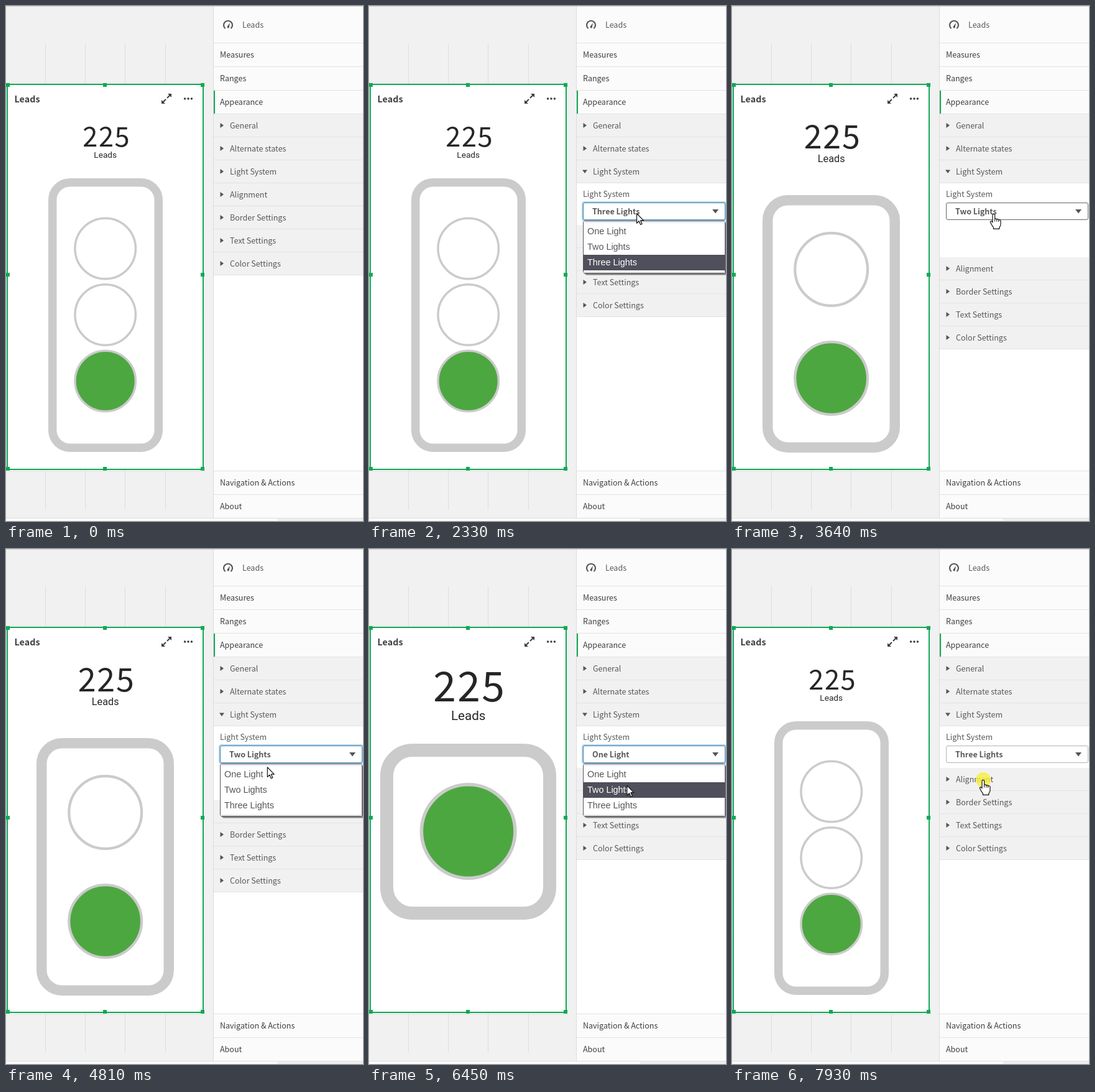
Recreate the animation shown at these times as an HTML page. Size 574 by 828 pixels, loop 8 s.

```html
<!DOCTYPE html>
<html lang="en">
<head>
<meta charset="utf-8">
<title>Light system settings</title>
<style>
  html, body { margin: 0; width: 100%; height: 100%; overflow: hidden; background: #fff; }
  svg { display: block; }
  text { font: 12.53px "Noto Sans CJK JP", "Noto Sans CJK SC", "Noto Sans CJK", sans-serif; fill: #595959; white-space: pre; }
  .dark { fill: #404040; }
  .bold { font-weight: 700; }
  .value { fill: #262626; letter-spacing: .035em; text-anchor: middle; }
  .label { fill: #262626; font-family: Roboto, sans-serif; text-anchor: middle; }
  .option { font: 14.4px "Liberation Sans", Arial, sans-serif; }
</style>
</head>
<body>
<svg id="stage" width="574" height="828" viewBox="0 0 574 828"></svg>
<script>
const LOOP = 8000;
const GREEN = '#0fa955', GREY = '#cbcbcb', LINE = '#e3e3e3', INK = '#555';
const NAMES = ['', 'One Light', 'Two Lights', 'Three Lights'];
const stage = document.getElementById('stage');

function el(tag, attrs, parent = stage) {
  const node = document.createElementNS('http://www.w3.org/2000/svg', tag);
  for (const key in attrs) node.setAttribute(key, attrs[key]);
  return parent.appendChild(node);
}
const group = parent => el('g', {}, parent);
const rect = (x, y, width, height, fill, parent) => el('rect', { x, y, width, height, fill }, parent);
const path = (d, attrs, parent) => el('path', { d, ...attrs }, parent);
function text(str, x, y, cls = '', parent) {
  const node = el('text', { x, y, class: cls }, parent);
  node.textContent = str;
  return node;
}
const show = (node, on) => node.setAttribute('visibility', on ? 'inherit' : 'hidden');

// Sheet with grid
rect(0, 0, 333, 824, '#f1f1f1');
for (const x of [63, 127, 191, 256]) rect(x, 60, 1, 750, '#dedede');
for (let i = 1; i < 12; i++) rect(0, Math.round(60 + i * 62.5), 320, 1, '#e4e4e4');

// Card
el('rect', { x: 2, y: 126, width: 315, height: 619, fill: '#fff', stroke: GREEN, 'stroke-width': 2 });
for (const x of [0, 156, 313])
  for (const y of [124, 429, 741])
    if (x !== 156 || y !== 429) rect(x, y, 6, 6, GREEN);
text('Leads', 13.5, 155, 'dark bold').style.fontSize = '14.4px';
path('M260 141h6v6zM250 151v6h6z', { fill: '#404040' });
path('M259 148l5-5M257 150l-5 5', { stroke: '#404040', 'stroke-width': 2 });
for (const cx of [287.6, 293, 298.4]) el('circle', { cx, cy: 149, r: 1.8, fill: '#404040' });

// Traffic lights
const looks = [
  { x: 18, y: 313, w: 283, h: 283, border: 21, round: 52, lamps: [454], r: 78, ring: 5.5, size: 66, base: 245, small: 20.6, foot: 275 },
  { x: 49, y: 304, w: 221, h: 414, border: 16.5, round: 41, lamps: [423.5, 598.5], r: 60.5, ring: 4.2, size: 52, base: 229, small: 16.3, foot: 251 },
  { x: 68, y: 277, w: 184, h: 440, border: 13.5, round: 35, lamps: [390, 496.5, 603], r: 50.5, ring: 3.5, size: 43.4, base: 226, small: 13.7, foot: 244 }
];
const lights = looks.map(k => {
  const g = group(), b = k.border;
  text('225', 161.7, k.base, 'value', g).style.fontSize = k.size + 'px';
  text('Leads', 159.7, k.foot, 'label', g).style.fontSize = k.small + 'px';
  el('rect', {
    x: k.x + b / 2, y: k.y + b / 2, width: k.w - b, height: k.h - b, rx: k.round - b / 2,
    fill: '#fff', stroke: GREY, 'stroke-width': b
  }, g);
  k.lamps.forEach((cy, i) => el('circle', {
    cx: 159.7, cy, r: k.r - k.ring / 2, stroke: GREY, 'stroke-width': k.ring,
    fill: i === k.lamps.length - 1 ? '#4da740' : '#fff'
  }, g));
  return g;
});

// Property panel
rect(333, 0, 241, 824, '#fff');
rect(333, 0, 1, 824, '#dcdcdc');
rect(334, 1, 240, 58, '#fbfbfb');
rect(334, 59, 240, 1, LINE);
path('M352.6 36.2A7 7 0 1 1 361.4 36.2', { fill: 'none', stroke: INK, 'stroke-width': 2.2 });
path('M355.4 33.5L360 27l-1.4 8a1.9 1.9 0 0 1-3.2-1.5z', { fill: INK });
text('Leads', 380, 35);

function section(name, y) {
  rect(334, y, 240, 37, '#fbfbfb');
  rect(334, y + 37, 240, 1, LINE);
  text(name, 344, y + 23, 'dark');
}
section('Measures', 60);
section('Ranges', 98);
section('Appearance', 136);
rect(334, 136, 2, 37, GREEN);
rect(334, 747, 240, 1, LINE);
section('Navigation & Actions', 748);
section('About', 786);

const rest = group();
let closedMark;
['General', 'Alternate states', 'Light System', 'Alignment', 'Border Settings', 'Text Settings', 'Color Settings']
  .forEach((name, i) => {
    const y = 174 + i * 37, parent = i > 2 ? rest : stage;
    rect(334, y, 240, 36, '#f1f1f1', parent);
    rect(334, y + 36, 240, 1, LINE, parent);
    const mark = path(`M344.5 ${y + 14}v8l5.5-4z`, { fill: INK }, parent);
    if (i === 2) closedMark = mark;
    text(name, 360, y + 23, '', parent);
  });

const details = group();
path('M343 263.5h8l-4 5.5z', { fill: INK }, details);
text('Light System', 344, 307, '', details);
const glow = el('rect', { x: 343.5, y: 315.5, width: 230, height: 29, rx: 3, fill: 'none', stroke: '#a9d2ea', 'stroke-width': 3 }, details);
const field = el('rect', { x: 344.5, y: 316.5, width: 228, height: 27, rx: 2.5, fill: '#fff' }, details);
const choice = text('', 359, 335, 'bold', details);
path('M552 327h10l-5 6.5z', { fill: INK }, details);

const menu = group();
el('rect', { x: 348, y: 349, width: 227, height: 84, rx: 3, fill: '#000', opacity: .25 }, menu);
el('rect', { x: 346, y: 347, width: 228, height: 85, rx: 3, fill: '#000', opacity: .3 }, menu);
el('rect', { x: 344.5, y: 345.5, width: 228, height: 84, rx: 2.5, fill: '#fff', stroke: '#55555f' }, menu);
rect(345, 346, 227, 3, '#eaeaef', menu);
rect(345, 426, 227, 3, '#f1f1f4', menu);
const bar = rect(345, 350, 227, 25, '#504f5c', menu);
const options = [1, 2, 3].map(n => text(NAMES[n], 351, 342 + n * 25, 'option', menu));

// Window edges
rect(0, 0, 574, 1, '#cfcfcf');
rect(0, 823, 574, 1, '#dedede');
rect(0, 824, 436, 4, '#fbfbfb');
rect(436, 824, 138, 4, '#eeeeee');

// Pointer, with its tip at the origin
const pointer = group();
const halo = el('circle', { r: 12, fill: '#f7f03c', opacity: .8 }, pointer);
const skin = { fill: '#fff', stroke: '#111', 'stroke-width': 1.2, 'stroke-linejoin': 'round' };
const arrow = path('M.5 .5V16.2L4.1 12.8L6.5 18.5L9 17.4L6.6 11.9H11.4Z', skin, pointer);
const hand = path('M-2 2Q-1.9 .4-.2 .4Q1.5 .4 1.6 2V8.3Q3.2 7.2 4.7 8.9Q6.4 8 7.7 9.8Q10.8 9.2 11 12V17Q10.8 20 8.8 22V24.4H-.5V22.2Q-2.5 20-4 16.8L-5.6 13.6Q-5.6 11.4-3.4 12L-2 13.8Z', skin, pointer);
path('M1.6 8.3v4.2M4.7 8.9v3.8M7.7 9.8v3.2', { fill: 'none', stroke: '#111' }, hand.parentNode);
const knuckles = pointer.lastChild;

// start, end, x, y: the pointer eases to (x, y) within that span
const moves = [
  [0, 0, 507, 792], [60, 810, 440, 266], [1560, 1900, 430, 333], [2330, 2830, 416, 385],
  [3160, 3640, 421, 334], [4680, 4910, 419, 361], [5480, 5900, 422, 332],
  [6290, 6580, 409, 414], [7350, 7730, 404, 371]
];
const clicks = [[980, 1110], [1950, 2080], [2900, 3000], [4380, 4500], [4960, 5060], [6160, 6280], [6690, 6800], [7930, LOOP]];
// menu opens, menu closes, chart redraws, new value
const picks = [[2010, 2960, 3060, 2], [4440, 5020, 5170, 1], [6220, 6760, 6960, 3]];

function locate(t) {
  let [, , x, y] = moves[0];
  for (const [start, end, tx, ty] of moves.slice(1)) {
    if (t < start) break;
    const p = Math.min(1, (t - start) / (end - start)), e = p * p * (3 - 2 * p);
    x += (tx - x) * e;
    y += (ty - y) * e;
  }
  return [x, y];
}

function draw(t) {
  const [x, y] = locate(t);
  const expanded = t >= 1040;
  let value = 3, mode = 3, open = false, focus = false, stale = false;
  picks.forEach(([opens, closes, redraw, next], i) => {
    if (t >= opens && t < closes) open = true;
    if (t >= opens && t < redraw) focus = true;
    if (t >= opens && t < [3160, 5480, 7350][i]) stale = true;
    if (t >= closes) value = next;
    if (t >= redraw) mode = next;
  });

  lights.forEach((g, i) => show(g, i + 1 === mode));
  show(details, expanded);
  show(closedMark, !expanded);
  rest.setAttribute('transform', `translate(0 ${!expanded ? 0 : mode === 2 ? 119 : 67})`);

  const hover = expanded && y > 316 && y < 345;
  show(glow, expanded && focus);
  field.setAttribute('stroke', focus ? '#4583a5' : hover ? '#666' : '#b3b3b3');
  if (choice.textContent !== NAMES[value]) choice.textContent = NAMES[value];

  show(menu, open);
  const row = y < 345 ? value - 1 : Math.min(2, Math.floor((y - 354) / 25));
  show(bar, open && row >= 0);
  bar.setAttribute('y', 350 + row * 25);
  options.forEach((o, i) => { o.style.fill = i === row ? '#fff' : '#555'; });

  const blank = (y > 433 && y < 747) || (mode === 2 && y > 345 && y < 404);
  const pointing = !stale && !blank;
  show(pointer, t >= 60);
  pointer.setAttribute('transform', `translate(${x.toFixed(1)} ${y.toFixed(1)})`);
  show(halo, t >= 60 && clicks.some(([a, b]) => t >= a && t < b));
  show(arrow, t >= 60 && !pointing);
  show(hand, t >= 60 && pointing);
  show(knuckles, t >= 60 && pointing);
}

function tick() {
  draw(performance.now() % LOOP);
  requestAnimationFrame(tick);
}
tick();
</script>
</body>
</html>
```
